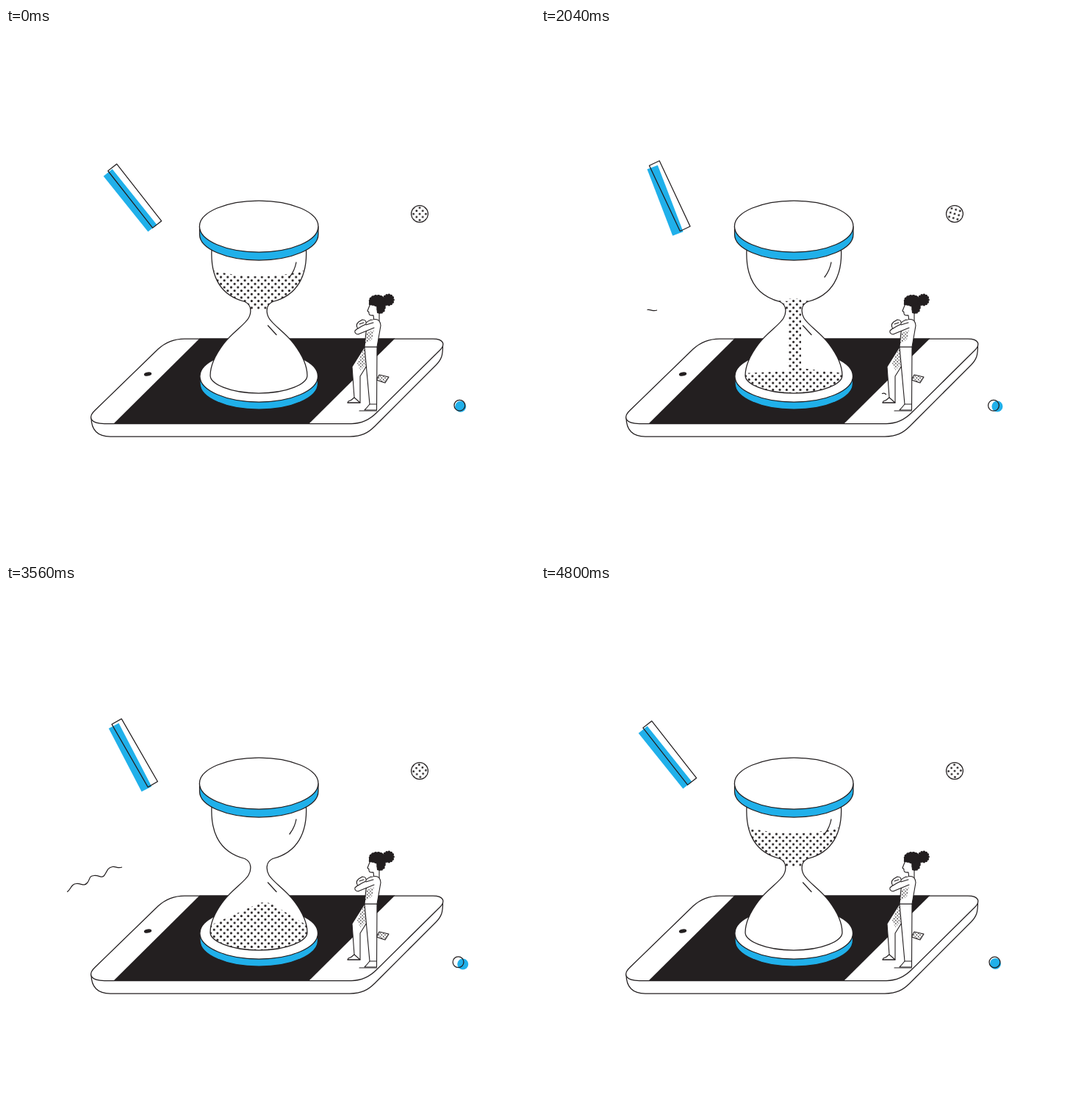
An HTML page that plays this animation: 720x720 px, repeating every 4.84 s.

```html
<!DOCTYPE html>
<html lang="en">
<head>
<meta charset="utf-8">
<title>Hourglass</title>
<style>
  html, body { margin: 0; height: 100%; overflow: hidden; background: #fff; }
  svg { display: block; width: 100vw; height: 100vh; }
  .line { fill: none; }
  .ink { fill: #231f20; stroke: none; }
  .blue { fill: #20b0ea; }
  .flat { stroke: none; }
</style>
</head>
<body>
<svg viewBox="0 0 720 720" fill="#fff" stroke="#231f20" stroke-width="1.25" stroke-linecap="round" stroke-linejoin="round">
  <defs>
    <pattern id="sandDots" x="336.7" y="336.7" width="9.3" height="9.3" patternUnits="userSpaceOnUse">
      <g class="ink"><circle cx="2.3" cy="2.3" r="1.55"/><circle cx="6.95" cy="6.95" r="1.55"/></g>
    </pattern>
    <pattern id="ballDots" x="-2.1" y="-2.1" width="8.4" height="8.4" patternUnits="userSpaceOnUse">
      <g class="ink"><circle cx="2.1" cy="2.1" r="1.4"/><circle cx="6.3" cy="6.3" r="1.4"/></g>
    </pattern>
    <pattern id="fineDots" width="4.4" height="4.4" patternUnits="userSpaceOnUse">
      <g class="ink"><circle cx="1.1" cy="1.1" r=".8"/><circle cx="3.3" cy="3.3" r=".8"/></g>
    </pattern>
    <path id="glass" d="M280,300 C278,338 292,364 325,372.5 C335,377 334,388 330,395 C324,405 308,414 296,430 C284,446 278,460 278,473 C278,484 304,497 344,497 C384,497 410,484 410,473 C410,460 404,446 392,430 C380,414 364,405 358,395 C354,388 353,377 363,372.5 C396,364 410.5,338 408.5,300"/>
    <clipPath id="inside"><use href="#glass"/></clipPath>
  </defs>

  <!-- phone -->
  <path d="M116,530 C116,546 124,556 142,556 H468 C484,556 493,551 502,542 L585,459 C593,451 594.5,445 594.5,433 L540,450 L150,500Z"/>
  <path d="M470,538.5 H134 C115,538.5 111,530 121,520.5 L207,437 Q222,423 243,423 H581 C596,423 599,431 589,440 L505,523 Q490,538.5 470,538.5Z"/>
  <path class="ink" d="M263.5,422.5 H529.5 L412,539 H146Z"/>
  <ellipse class="ink" cx="193" cy="471" rx="5.2" ry="2.6" transform="rotate(-8 193 471)"/>

  <!-- hourglass -->
  <g id="hourglass">
    <path class="blue" d="M264,474 V484 A80,35 0 0 0 424.5,484 V474"/>
    <ellipse cx="344.2" cy="474" rx="80.3" ry="35"/>
    <use href="#glass"/>
    <g clip-path="url(#inside)"><path id="sand" class="flat" fill="url(#sandDots)"/></g>
    <path class="line" d="M395,319 Q393,330 386,339 M356.5,405 L368,417.5"/>
    <path class="blue" d="M263.5,270 V281 A80.7,35 0 0 0 425,281 V270"/>
    <ellipse cx="344.2" cy="270" rx="80.8" ry="35"/>
  </g>

  <!-- woman -->
  <g stroke-width="1.1">
    <path fill="url(#fineDots)" d="M508,472 L521,475 L516,483 L504,479Z"/>
    <path d="M488,434 L471,461 L474,503 Q470,507 466,508 L465,510 H482 V474 L492,458Z"/>
    <path class="flat" fill="url(#fineDots)" d="M488,435 L478,456 L482,466 L491,457Z"/>
    <path d="M488,434 L495,512 Q491,517 488,520 H504.5 L505,434Z"/>
    <path class="line" d="M474,503 L482,510 H465 M481,521 H504.5 M495,512 H504"/>
    <path d="M496,375 L492,385 L494,387 Q493,392 500,391 L501,399 H508 V380Z"/>
    <path d="M496,398 Q509,393 510,405 L505,434 H488 L490,414Z"/>
    <path class="flat" fill="url(#fineDots)" d="M490,416 L501,410 L498,424 L489,430Z"/>
    <path d="M497,397 C489,400 489,404 483,405 L475,412 Q474,416 479,417 L501,408"/>
    <path d="M479,409 Q475,404 480,400 L485,397 Q491,397 490,403 L484,406Z"/>
    <path class="line" d="M481,403 L487,401 M490,404 L500,401"/>
    <path class="ink" d="M494,377 C493,367 499,362 510,364 C518,367 519,378 514,386 L509,389 L505,388 L504,378Z"/>
    <g class="ink" id="curls"></g>
  </g>
  <path id="tap" class="line" d="M464.5,497.5 Q467,496.5 469.5,498.5"/>

  <!-- floating shapes -->
  <rect id="barFill" class="blue flat" x="-7.7" y="-48.5" width="15.4" height="97"/>
  <rect id="barLine" class="line" x="-7.6" y="-49.3" width="15.2" height="98.6"/>
  <circle cx="563" cy="253" r="11.4"/>
  <circle id="ball" class="flat" r="11" fill="url(#ballDots)"/>
  <circle id="dotFill" class="blue flat" r="7.5"/>
  <circle id="dotLine" class="line" r="7.4"/>
  <path id="squiggle" class="line" pathLength="1" stroke-linecap="butt" d="M83,418 C89,414 88,407 96,406.5 C103,406 106,411 111,405 C115,399 113,396 120,395.5 C128,395 130,400 134,395 C138,389 138,385 145,383.5 C150,383 152,386 158,384"/>
</svg>
<script>
const LOOP = 4840;
const $ = id => document.getElementById(id);
const set = (id, name, value) => $(id).setAttribute(name, value);
const ramp = (t, start, length) => Math.min(1, Math.max(0, (t - start) / length));
const ease = (t, start, length) => { const u = ramp(t, start, length); return u * u * (3 - 2 * u); };

// Linear track through [time, value] pairs
function track(t, ...keys) {
  let value = keys[0][1];
  for (let i = 1; i < keys.length; i++) {
    const [t0, v0] = keys[i - 1], [t1, v1] = keys[i];
    value += (v1 - v0) * ramp(t, t0, t1 - t0);
  }
  return value;
}

// Curly outline of the hair and bun
function addCurls(cx, cy, rx, ry, count) {
  let out = `<ellipse cx="${cx}" cy="${cy}" rx="${rx}" ry="${ry}"/>`;
  for (let i = 0; i < count; i++) {
    const a = i / count * 2 * Math.PI;
    out += `<circle cx="${cx + rx * Math.cos(a)}" cy="${cy + ry * Math.sin(a)}" r="1.8"/>`;
  }
  $('curls').innerHTML += out;
}
addCurls(520.5, 370, 6.6, 6.7, 13);
addCurls(505, 371, 9.5, 6.3, 14);
addCurls(510.5, 381, 4.5, 6, 9);

const upperSand = (level, bottom) =>
  `M270,${level} Q344,${level + 22} 418,${level} V${bottom} H270Z`;

function sandPath(t, turn) {
  if (turn >= .5) {
    const left = 1 - turn;
    return upperSand(327 - 30 * left, 384 - 36 * left);
  }
  const level = track(t, [250, 327], [1120, 345], [2040, 361], [2300, 374]);
  const streamTop = track(t, [2050, 368], [2600, 445]);
  const streamEnd = track(t, [250, 380], [1120, 482], [1180, 495]);
  const edge = track(t, [1100, 496], [2040, 470], [2700, 466]) - 90 * turn;
  const peak = track(t, [1100, 496], [2040, 462], [2700, 432]) - 75 * turn;
  const floor = 500 - 180 * turn;
  const stream = t > 250 && t < 2600
    ? `M336,${Math.min(streamTop, streamEnd)} H354 V${streamEnd} H336Z` : '';
  const pile = t > 1100
    ? `M272,${edge} L336,${peak + 5} Q349,${peak - 3} 362,${peak + 2} L414,${edge} V${floor} Q344,${520 - 165 * turn} 272,${floor}Z` : '';
  return (t < 2250 ? upperSand(level, 384) : '') + stream + pile;
}

function draw(t) {
  const phase = t / LOOP * 2 * Math.PI;

  // The half turn swaps ends when the hourglass lies flat
  const turn = ease(t, 3628, 490);
  const tilt = turn < .5 ? -180 * turn : 180 * (1 - turn);
  set('hourglass', 'transform', `rotate(${tilt} 342 388)`);
  set('sand', 'd', sandPath(t, turn));

  const sway = (1 - Math.cos(phase)) / 2 + .06 * Math.sin(phase) ** 2;
  set('barLine', 'transform', `translate(175.2 228.6) rotate(${-38.1 + 13.6 * sway})`);
  set('barFill', 'transform', `translate(169 234.7) rotate(${-38.7 + 18.6 * sway})`);
  set('ball', 'transform', `translate(563 253) rotate(${t / LOOP * 360})`);

  const orbit = 1.25 * Math.PI + 3 * phase - .7 * Math.sin(phase);
  const dx = Math.cos(orbit), dy = Math.sin(orbit);
  set('dotFill', 'transform', `translate(${620 + 1.9 * dx} ${516.6 + 1.9 * dy})`);
  set('dotLine', 'transform', `translate(${616.6 - 1.1 * dx} ${512.9 - 1.1 * dy})`);

  const pass = t < 2300 ? t : t - 2160;
  const head = ease(pass, 190, 1200), tail = ease(pass, 1373, 880);
  set('squiggle', 'stroke-dasharray', `0 ${tail} ${head - tail} 2`);
  set('squiggle', 'visibility', head > tail ? 'visible' : 'hidden');
  set('tap', 'visibility', t > 1800 && t < 3300 ? 'visible' : 'hidden');
}

const begin = performance.now();
function tick() {
  draw((performance.now() - begin) % LOOP);
  requestAnimationFrame(tick);
}
tick();
</script>
</body>
</html>
```
